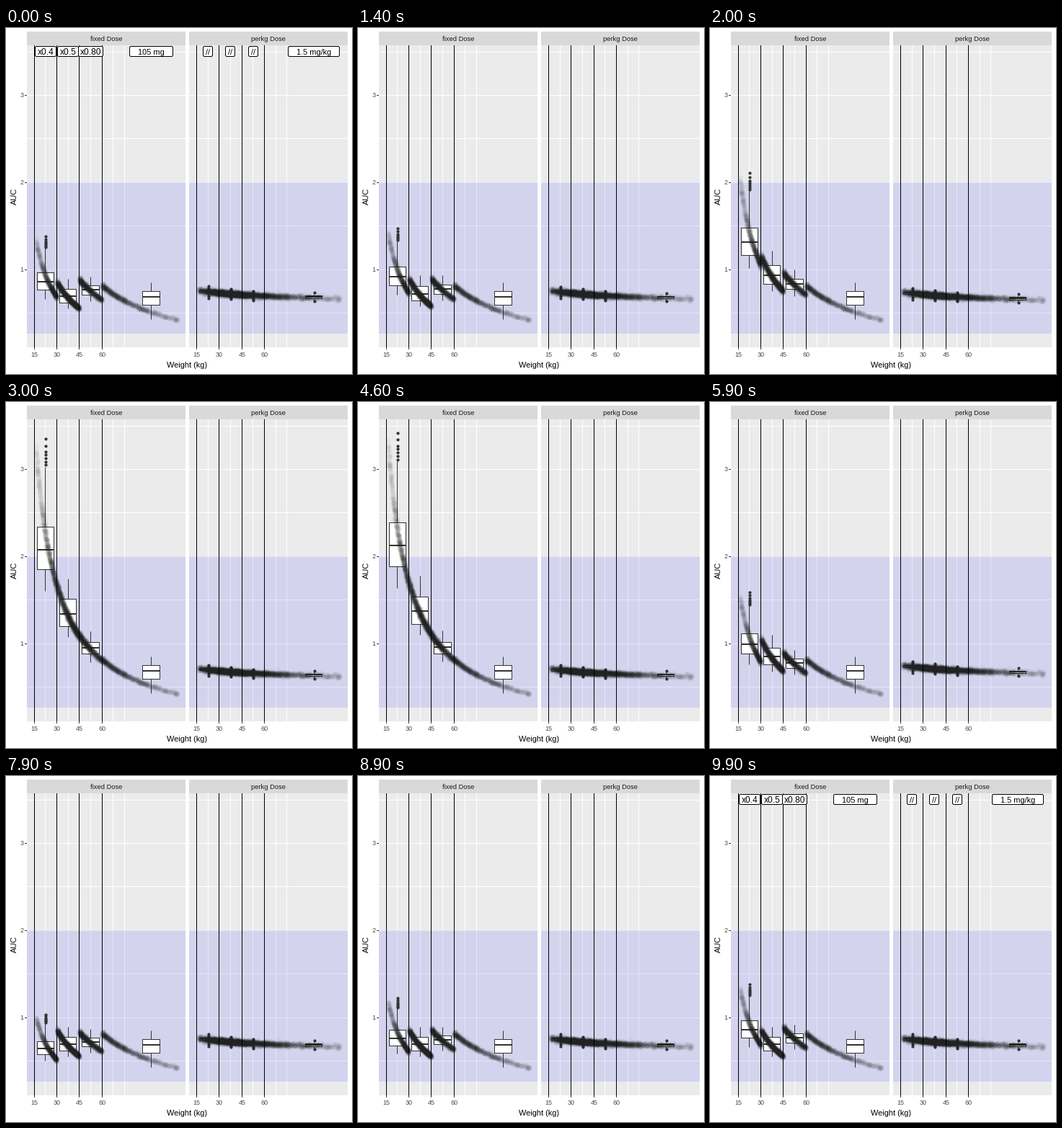
Recreate the animation shown at these times as a matplotlib script. Size 480x480 px, loop 10 s.

```python
import numpy as np
import matplotlib
import matplotlib.pyplot as plt
from matplotlib.animation import FuncAnimation
from matplotlib.collections import LineCollection, PolyCollection
from matplotlib.patches import FancyBboxPatch, Rectangle

matplotlib.rcParams["font.family"] = "Liberation Sans"

SIZE, DPI = 480, 72
FRAMES, STEP = 100, 100
TOP, BOTTOM = 24, 443
PANELS = [(29, "fixed Dose"), (254.3, "perkg Dose")]
PANEL_W = 220
CUTS = [15, 30, 45, 60]
BOX_WEIGHT = np.array([22.5, 37.5, 52.5, 92.8])
INK = "#333333"

# Dose factor per weight band, mg/kg dose, band labels
STATES = [
    (np.array([0.4, 0.5, 0.8, 1]), 1.5, ["x0.4", "x0.5", "x0.80"]),
    (np.array([1.0, 1, 1, 1]), 1.4, ["//", "//", "//"]),
    (np.array([0.3, 0.5, 0.75, 1]), 1.5, ["x0.30", "x0.50", "x0.75"]),
]

# Low whisker, lower hinge, median, upper hinge, high whisker at full dose
FIXED_BOX = np.array([
    [1.650, 1.905, 2.140, 2.410, 3.120],
    [1.100, 1.225, 1.375, 1.545, 1.785],
    [0.790, 0.886, 0.956, 1.020, 1.147],
    [0.425, 0.594, 0.680, 0.745, 0.847],
])
PERKG_BOX = (np.array([[0.748], [0.722], [0.706], [0.682]])
             + np.array([-0.04, -0.015, 0, 0.013, 0.035]))
FIXED_OUT = [(0, v) for v in (3.46, 3.38, 3.31, 3.27, 3.23, 3.19, 3.15)]
PERKG_OUT = [(0, 0.812), (0, 0.792), (0, 0.700), (0, 0.675),
             (1, 0.785), (1, 0.765), (1, 0.680), (1, 0.664),
             (2, 0.755), (2, 0.743), (2, 0.666), (2, 0.652),
             (3, 0.738), (3, 0.640)]


def px(weight, left):
    return left + 9.6 + (weight - 15) * 2.09


def py(value):
    return 334.6 - (value - 1) * 120.75


def mid(v):
    """Centre of the nearest pixel, for crisp lines."""
    return np.round(v) + 0.5


rng = np.random.default_rng(7)
weight = np.exp(rng.normal(np.log(44), 0.45, 2600))
weight = weight[(weight > 16.2) & (weight < 111)]
noise = 1 + rng.normal(0, 0.021, weight.size)
band = np.digitize(weight, CUTS[1:])
fixed_auc = 0.815 * (60 / weight) ** 1.07 * noise
perkg_auc = fixed_auc * weight / 70

fig = plt.figure(figsize=(SIZE / DPI, SIZE / DPI), dpi=DPI, facecolor="white")
ax = fig.add_axes([0, 0, 1, 1])
ax.set_xlim(0, SIZE)
ax.set_ylim(SIZE, 0)
ax.axis("off")


def rect(x, y, w, h, color, z, **kw):
    ax.add_patch(Rectangle((x, y), w, h, fc=color, lw=0, zorder=z, **kw))


def line(xs, ys, color, z, width=1):
    ax.plot(xs, ys, color=color, lw=width, zorder=z, snap=False,
            solid_capstyle="butt")


def vline(x, y0, y1, color, z, width=1):
    line([mid(x)] * 2, [y0, y1], color, z, width)


def hline(y, x0, x1, color, z, width=1):
    line([x0, x1], [mid(y)] * 2, color, z, width)


def text(x, y, s, size, color="black", **kw):
    opts = dict(ha="center", va="center_baseline", zorder=9)
    opts.update(kw)
    return ax.text(x, y, s, fontsize=size, color=color, **opts)


def draw_panel(left, title):
    x0, x1 = round(left), round(left) + PANEL_W
    rect(x0, 5, PANEL_W, TOP - 5, "#D9D9D9", 1)
    text(x0 + PANEL_W / 2, 15, title, 9.4, "#1A1A1A")
    rect(x0, TOP, PANEL_W, BOTTOM - TOP, "#EBEBEB", 1)
    for v in np.arange(0.5, 4, 0.5):
        hline(py(v), x0, x1, "white", 2)
    for w in (22.5, 37.5, 52.5, 67.5, 75):
        vline(px(w, left), TOP, BOTTOM, "white", 2)
    rect(x0, 214, PANEL_W, 210, "blue", 3, alpha=0.1)
    for w in CUTS:
        x = px(w, left)
        vline(x, TOP, BOTTOM, "black", 7)
        vline(x, BOTTOM, BOTTOM + 3, INK, 7)
        text(mid(x), 453, str(w), 9, "#4D4D4D")


class Layer:
    """Boxes, outliers and points of one panel."""

    def __init__(self, left, auc, stats, outliers):
        self.auc, self.stats = auc, stats
        self.x = px(weight, left) + 0.5
        self.box_x = px(BOX_WEIGHT, left)
        self.out_band = np.array([b for b, _ in outliers])
        self.out_val = np.array([v for _, v in outliers])
        self.whiskers = LineCollection([], colors=INK, linewidths=1, zorder=4)
        self.boxes = PolyCollection([], facecolors="white", edgecolors=INK,
                                    linewidths=1, zorder=4.1)
        self.medians = LineCollection([], colors=INK, linewidths=2, zorder=4.2)
        self.dots = ax.scatter([], [], s=4.2 ** 2, c=INK, lw=0, zorder=4.3)
        self.points = ax.scatter([], [], s=7 ** 2, c="#222222", alpha=0.034,
                                 lw=0, zorder=5)
        for c in (self.whiskers, self.boxes, self.medians):
            ax.add_collection(c, autolim=False)
            c.set_snap(False)
        self.dots.set_snap(False)
        self.points.set_snap(False)

    def update(self, factor):
        """factor: dose multiplier for each of the four weight bands."""
        whiskers, boxes, medians = [], [], []
        for x, row in zip(self.box_x, mid(py(self.stats * factor[:, None]))):
            lo, q1, med, q3, hi = row
            a, b, c = mid(x - 11.75), mid(x + 11.75), mid(x)
            whiskers += [[(c, lo), (c, q1)], [(c, q3), (c, hi)]]
            boxes.append([(a, q1), (b, q1), (b, q3), (a, q3)])
            medians.append([(a, med - 0.5), (b, med - 0.5)])
        self.whiskers.set_segments(whiskers)
        self.boxes.set_verts(boxes)
        self.medians.set_segments(medians)
        k = self.out_band
        self.dots.set_offsets(np.column_stack(
            [mid(self.box_x[k]), mid(py(self.out_val * factor[k]))]))
        self.points.set_offsets(np.column_stack(
            [self.x, py(self.auc * factor[band]) + 0.5]))


def label(x, s, width, size=11):
    a, b = mid(x - width / 2), mid(x + width / 2)
    box = FancyBboxPatch((a + 2, 27.5), b - a - 4, 10,
                         boxstyle="round,pad=2,rounding_size=2",
                         fc="white", ec="black", lw=1, zorder=8)
    ax.add_patch(box)
    return [box, text((a + b) / 2, 32.7, s, size)]


def state_labels(dose, names):
    widths = {2: 13, 4: 28.5, 5: 34.5}
    fixed_x, perkg_x = (px(BOX_WEIGHT, left) for left, _ in PANELS)
    items = []
    for xf, xp, s in zip(fixed_x, perkg_x, names):
        items += label(xf, s, widths[len(s)], 12)
        items += label(xp, "//", widths[2])
    items += label(fixed_x[3], "105 mg", 60)
    items += label(perkg_x[3], f"{dose} mg/kg", 71)
    return items


for left, title in PANELS:
    draw_panel(left, title)
for v in (1, 2, 3):
    hline(py(v), 26, 29, INK, 7)
    text(24.5, py(v) - 0.3, str(v), 9, "#4D4D4D", ha="right")
text(251.5, 467, "Weight (kg)", 11)
text(11.5, 233.5, "AUC", 11, rotation=90, va="center")

fixed = Layer(PANELS[0][0], fixed_auc, FIXED_BOX, FIXED_OUT)
perkg = Layer(PANELS[1][0], perkg_auc, PERKG_BOX, PERKG_OUT)
labels = [state_labels(dose, names) for _, dose, names in STATES]

# From state, to state, last still frame, arrival frame, ease start, ease length
MOVES = [(0, 1, 11, 33, 11.0, 22.2),
         (1, 2, 45, 66, 44.4, 21.4),
         (2, 0, 78, 99, 77.6, 21.4)]


def pose(i):
    """States to blend, eased progress, and the state at rest (or None)."""
    for a, b, leave, arrive, start, length in MOVES:
        if i <= leave:
            return a, a, 0, a
        if i < arrive:
            t = min((i - start) / length, 1)
            return a, b, 0.5 - 0.5 * np.cos(np.pi * t), None
    return 0, 0, 0, 0


def draw(i):
    a, b, t, rest = pose(i)
    (fa, da, _), (fb, db, _) = STATES[a], STATES[b]
    fixed.update(fa + (fb - fa) * t)
    perkg.update(np.full(4, (da + (db - da) * t) / 1.5))
    for k, items in enumerate(labels):
        for item in items:
            item.set_visible(k == rest)
    return []


anim = FuncAnimation(fig, draw, frames=FRAMES, interval=STEP,
                     repeat=True, repeat_delay=0, blit=False)
plt.show()
```
